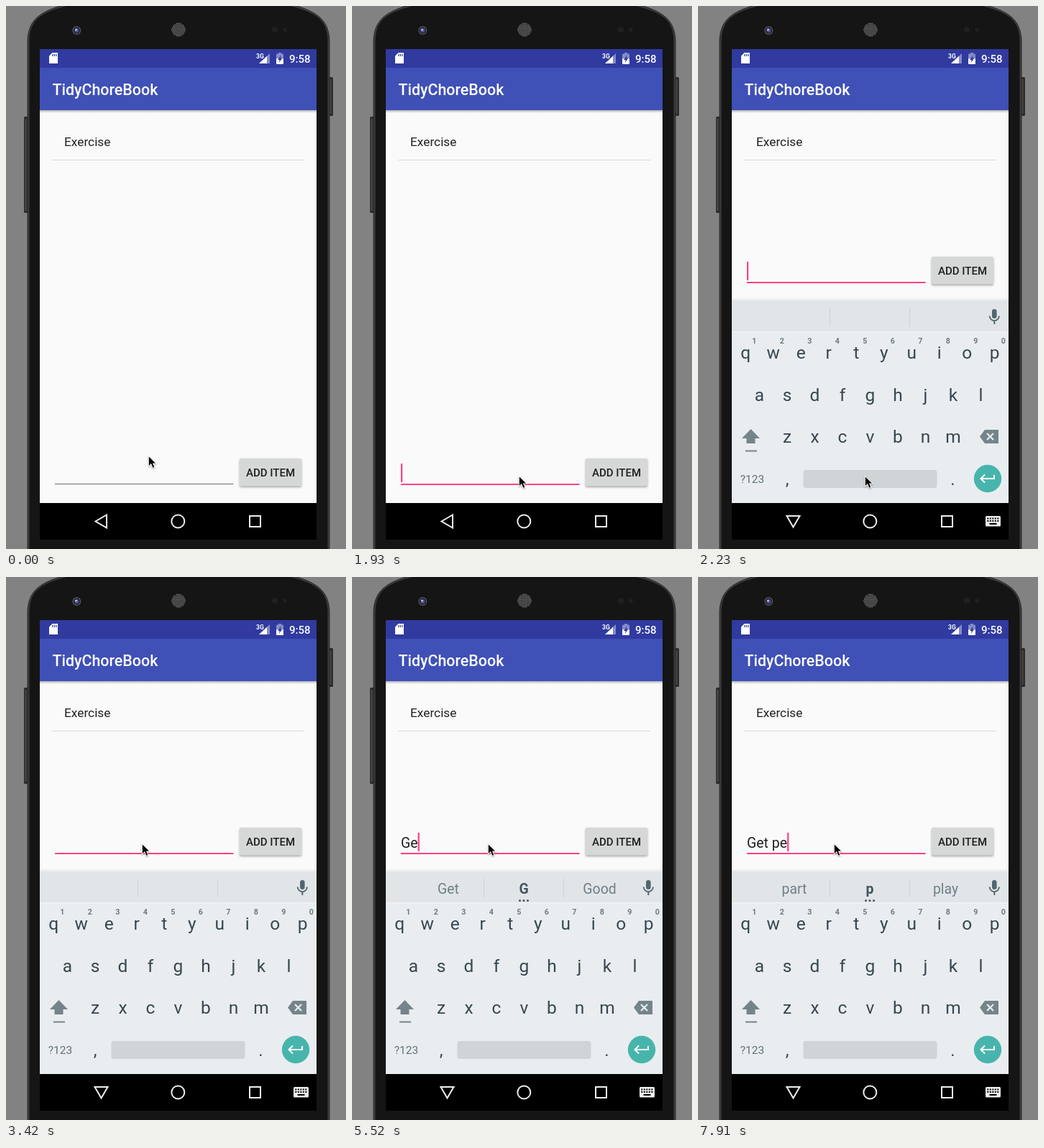
Recreate the animation shown at these times as an HTML page with a canvas. Size 473 px wide and 756 px high, loop 8000 ms.

```html
<!DOCTYPE html>
<html lang="en">
<head>
<meta charset="utf-8">
<title>To-do app demo</title>
<style>
html, body { margin: 0; width: 100%; height: 100%; overflow: hidden; background: #828282; }
canvas { display: block; width: 473px; height: 756px; }
</style>
</head>
<body>
<canvas id="stage" width="473" height="756"></canvas>
<script>
const ctx = document.getElementById('stage').getContext('2d');
const LOOP = 8000;
const TICK = 149;
const FOCUS = 1922;
const KEYBOARD = 2070;
const BLINK = 500;
const HINT_LAG = 150;
const PINK = '#ff4081';

const easeIn = s => s * s;
const easeOut = s => 1 - (1 - s) ** 2;
const easeBoth = s => s * s * (3 - 2 * s);

// Pointer strokes: quadratic curves through from, via, to.
const strokes = [
  { start: 0, end: 1020, from: [198, 626], via: [100, 650], to: [474, 765], ease: easeIn },
  { start: 1180, end: 1930, from: [455, 733], via: [300, 672], to: [232, 654], ease: easeOut },
  { start: 2380, end: 3420, from: [232, 654], via: [290, 560], to: [189, 371], ease: easeBoth }
];

const bursts = [
  { text: 'Get ', start: 5000, gap: 403 },
  { text: 'pe', start: 7740, gap: 150 }
];
const presses = bursts.flatMap(b => [...b.text].map((key, i) => ({ key, time: b.start + i * b.gap })));

// Left and right suggestions for the word being typed.
const guesses = {
  '': ['a', 'it'], G: ['Get', 'Good'], Ge: ['Gets', 'Getting'],
  Get: ['Gets', 'Getting'], p: ['part', 'play']
};

const typedAt = t => presses.filter(p => p.time <= t).map(p => p.key).join('');

function caretOn(t) {
  const resets = [FOCUS, ...presses.map(p => p.time)].filter(time => time <= t);
  return resets.length > 0 && Math.floor((t - resets.pop()) / BLINK) % 2 === 0;
}

function pointerAt(t) {
  const { start, end, from, via, to, ease } = strokes.findLast(s => s.start <= t);
  const s = ease(Math.min(1, (t - start) / (end - start)));
  return from.map((a, i) => a * (1 - s) ** 2 + 2 * via[i] * s * (1 - s) + to[i] * s * s);
}

function rect(x, y, w, h, color, r = 0) {
  ctx.fillStyle = color;
  ctx.beginPath();
  ctx.roundRect(x, y, w, h, r);
  ctx.fill();
}

function disc(x, y, r, color) {
  ctx.fillStyle = color;
  ctx.beginPath();
  ctx.arc(x, y, r, 0, Math.PI * 2);
  ctx.fill();
}

function trace(points, close) {
  ctx.beginPath();
  points.forEach(([x, y]) => ctx.lineTo(x, y));
  if (close) ctx.closePath();
}

function poly(points, color) {
  trace(points, true);
  ctx.fillStyle = color;
  ctx.fill();
}

function line(points, color, width, close = false) {
  trace(points, close);
  ctx.strokeStyle = color;
  ctx.lineWidth = width;
  ctx.stroke();
}

function text(str, x, y, size, color, weight = 400, align = 'left') {
  ctx.font = `${weight} ${size}px Roboto, sans-serif`;
  ctx.textAlign = align;
  ctx.fillStyle = color;
  ctx.fillText(str, x, y);
}

const centered = (str, x, y, size, color, weight) => text(str, x, y, size, color, weight, 'center');

function shade(y, h, from, to) {
  const g = ctx.createLinearGradient(0, y, 0, y + h);
  g.addColorStop(0, from);
  g.addColorStop(1, to);
  rect(47, y, 385, h, g);
}

function shell(inset, color) {
  const l = 29.5 + inset, r = 450.5 - inset, top = inset - 3;
  ctx.beginPath();
  ctx.moveTo(l, 760);
  ctx.lineTo(l, 48);
  ctx.bezierCurveTo(l + 1, 20, 46, 7 + inset, 84, top);
  ctx.lineTo(396, top);
  ctx.bezierCurveTo(434, 7 + inset, r - 1, 20, r, 48);
  ctx.lineTo(r, 760);
  ctx.fillStyle = color;
  ctx.fill();
}

function sideButton(x, y, h) {
  rect(x, y, 6, h, '#2b2b2b', 1.5);
  rect(x + 1.5, y + 3, 2, h - 6, '#4a4a4a');
}

function drawPhone() {
  rect(0, 0, 473, 756, '#828282');
  sideButton(25, 154, 134);
  sideButton(449, 99, 54);
  shell(0, '#2a2a2a');
  shell(1, '#3c3c3c');
  shell(3, '#151515');

  disc(98.3, 34, 6, '#555');
  disc(98.3, 34, 4.6, '#1d1d2c');
  disc(98.3, 34, 3, '#5252a0');
  disc(97.5, 33, 1.3, '#c8caec');

  disc(240, 33, 10, '#2c2c2c');
  for (let row = -4; row <= 4; row++) {
    for (let col = -4; col <= 4; col++) {
      const dx = col * 2.3 + (row % 2 ? 1.15 : 0), dy = row * 2.1;
      if (Math.hypot(dx, dy) < 9.5) disc(240 + dx, 33 + dy, 0.8, '#767676');
    }
  }
  disc(374, 33, 4, '#202020');
  disc(388, 33, 2.8, '#202020');
}

function drawStatus() {
  const bar = '#303a9f', dim = '#858bc8';
  rect(47, 60, 385, 26, bar);
  poly([[64.5, 65], [72, 65], [72, 80], [60, 80], [60, 69.5]], '#fff');
  for (let i = 0; i < 3; i++) rect(64.3 + i * 2.5, 67, 1.2, 3, bar);
  text('3G', 348, 73, 8.5, '#fff', 700);
  poly([[367, 66], [367, 80], [352, 80]], dim);
  poly([[363, 69.8], [363, 80], [352, 80]], '#fff');
  rect(379, 65, 4, 3, dim);
  rect(376, 66.5, 10, 7, dim, 1);
  rect(376, 73, 10, 8, '#fff', 1);
  poly([[382.5, 68.5], [378, 75], [380.6, 75], [379.8, 79], [384.3, 72.6], [381.8, 72.6]], bar);
  text('9:58', 394, 79, 15, '#fff', 500);
}

function drawButton(y) {
  ctx.save();
  ctx.shadowColor = 'rgba(0,0,0,.35)';
  ctx.shadowBlur = 3;
  ctx.shadowOffsetY = 1.5;
  rect(325, y, 86, 38.5, '#d6d7d7', 2);
  ctx.restore();
  centered('ADD ITEM', 368, y + 25, 15, '#1f1f1f', 500);
}

function drawApp(t, lift) {
  rect(47, 86, 385, 606, '#fafafa');
  rect(47, 86, 385, 59, '#3f50b7');
  shade(145, 4, 'rgba(0,0,0,.28)', 'rgba(0,0,0,0)');
  text('TidyChoreBook', 64.5, 124, 21.4, '#fff', 500);
  text('Exercise', 81, 194.5, 17.3, '#212121');
  rect(64, 214, 351, 1, '#dadada');

  const focused = t >= FOCUS;
  rect(68, 665 - lift, 248.5, focused ? 2 : 1, focused ? PINK : '#6b6b6b');
  const str = typedAt(t);
  text(str, 68, 658 - lift, 19.5, '#212121');
  if (caretOn(t)) rect(68 + ctx.measureText(str).width, 637 - lift, 2.2, 26, PINK);
  drawButton(630 - lift);
}

function drawHints(t) {
  const str = typedAt(t - HINT_LAG);
  if (!str) return;
  const word = str.split(' ').pop();
  const [left, right] = guesses[word] || guesses.p;
  const strong = '#42545d', soft = '#6f7f86';
  centered(left, 134, 440.5, 19.4, soft);
  centered(word || 'the', 239, 440.5, 19.4, strong, word ? 700 : 400);
  centered(right, 344.5, 440.5, 19.4, soft);
  if (word) for (let i = -1; i <= 1; i++) disc(239 + i * 5.5, 450.5, 1.5, strong);
}

function drawMic() {
  const color = '#53666f';
  rect(409, 422, 6.6, 13, color, 3.3);
  ctx.beginPath();
  ctx.arc(412.3, 431.5, 6.6, 0, Math.PI);
  ctx.strokeStyle = color;
  ctx.lineWidth = 1.9;
  ctx.stroke();
  rect(411.3, 438, 2, 5, color);
}

function keyRow(keys, x, y, size = 24.5, color = '#37474f', weight = 400) {
  [...keys].forEach((key, i) => centered(key, x + i * 38.5, y, size, color, weight));
}

function drawKeyboard(t) {
  const face = '#e9edf0', gray = '#74848a';
  shade(406, 5, 'rgba(225,229,232,0)', '#e1e5e8');
  rect(47, 411, 385, 43, '#e1e5e8');
  rect(47, 453, 385, 239, face);
  rect(47, 453, 385, 1.5, '#f1f4f6');
  for (const x of [183, 294]) rect(x, 420, 1, 26, '#cbd2d6');
  drawHints(t);
  drawMic();

  keyRow('qwertyuiop', 66.2, 491);
  keyRow('asdfghjkl', 85.5, 549.5);
  keyRow('zxcvbnm', 124, 608);
  keyRow('1234567890', 78.3, 470, 10.7, '#6d7c83', 700);

  poly([[61, 602], [73.5, 589], [86, 602], [79.5, 602], [79.5, 609], [67.5, 609], [67.5, 602]], gray);
  rect(66, 618.5, 16, 2, gray);
  poly([[392, 599.5], [399, 590], [418, 590], [418, 609], [399, 609]], gray);
  line([[402, 595], [411, 604]], face, 2.2);
  line([[411, 595], [402, 604]], face, 2.2);

  centered('?123', 75.5, 664, 15.5, '#617178');
  keyRow(',', 124, 667, 24);
  keyRow('.', 354.5, 667, 24);
  rect(146.5, 646, 186, 25, '#cfd4d7', 3.5);
  disc(403, 658, 19.2, '#47b5ac');
  line([[412, 653], [412, 658], [394.5, 658]], '#fff', 2);
  line([[399, 652.5], [393.5, 658], [399, 663.5]], '#fff', 2);
}

function drawNav(open) {
  const ink = '#eee';
  rect(47, 692, 385, 51, '#000');
  const back = open
    ? [[123.5, 710], [141.5, 710], [132.5, 725.5]]
    : [[124.5, 717.5], [140, 708.5], [140, 726.5]];
  line(back, ink, 2, true);
  ctx.beginPath();
  ctx.arc(239.3, 717.5, 9, 0, Math.PI * 2);
  ctx.stroke();
  ctx.strokeRect(339, 710, 15, 15);
  if (!open) return;
  rect(400, 710, 21, 14.5, ink, 1.5);
  for (let row = 0; row < 2; row++) {
    for (let col = 0; col < 5; col++) rect(402.3 + col * 3.5, 712.5 + row * 3.4, 2, 2, '#000');
  }
  rect(405.5, 720, 10, 2, '#000');
}

function drawPointer([x, y]) {
  const arrow = [[0.8, 1.5], [0.8, 14], [4, 11], [6.3, 16.8], [8.3, 16], [6, 10.4], [10, 10.4]];
  ctx.save();
  ctx.translate(x, y);
  ctx.shadowColor = 'rgba(0,0,0,.35)';
  ctx.shadowBlur = 2;
  ctx.shadowOffsetY = 1;
  line(arrow, '#fff', 2, true);
  ctx.shadowColor = 'transparent';
  poly(arrow, '#000');
  ctx.restore();
}

function draw(t) {
  const open = t >= KEYBOARD;
  drawPhone();
  drawApp(t, open ? 281 : 0);
  drawStatus();
  if (open) {
    const shown = Math.min(1, 0.75 + (t - KEYBOARD) / 600);
    ctx.save();
    ctx.beginPath();
    ctx.rect(47, 349, 385, 343);
    ctx.clip();
    ctx.globalAlpha = shown;
    ctx.translate(0, (1 - shown) * 144);
    drawKeyboard(t);
    ctx.restore();
  }
  drawNav(open);
  if (t >= 1040 && t < 1180) rect(447, 749, 40, 20, '#ececec', 5);
  drawPointer(pointerAt(t));
}

const start = performance.now();
function loop() {
  const t = (performance.now() - start) % LOOP;
  draw(Math.floor((t + 8) / TICK) * TICK);
  requestAnimationFrame(loop);
}
loop();
</script>
</body>
</html>
```
